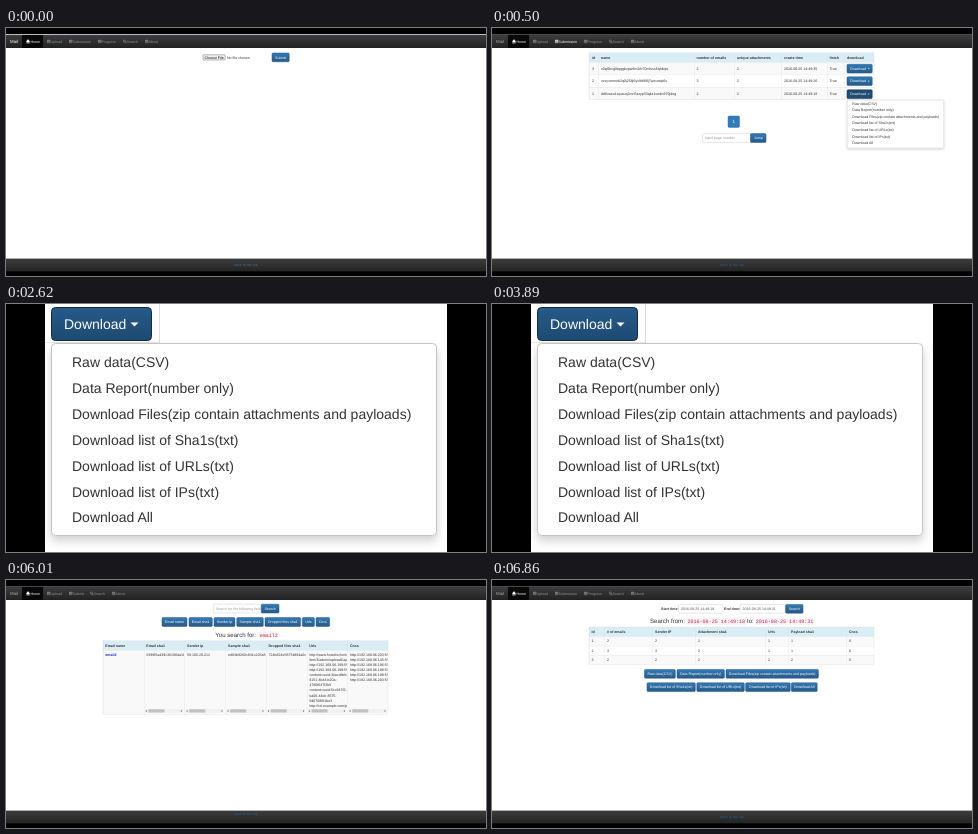
Write an HTML page that moves like this. It is 480 by 248 pixels and loops after 8 s.

```html
<!DOCTYPE html>
<html lang="en">
<head>
<meta charset="utf-8">
<title>Mail file reports</title>
<style>
html, body { margin: 0; width: 100%; height: 100%; overflow: hidden; background: #000; }
svg { display: block; width: 100vw; height: 100vh; }
text { font-family: "Liberation Sans", Arial, sans-serif; text-rendering: geometricPrecision; white-space: pre; }
.mono { font-family: "Liberation Mono", monospace; }
</style>
</head>
<body>
<svg id="stage" viewBox="0 0 480 248" xmlns="http://www.w3.org/2000/svg"></svg>
<script>
const SMALL = 3.58, LINE = '#ddd';

const rect = (x, y, w, h, fill, extra = '') =>
  `<rect x="${x}" y="${y}" width="${w}" height="${h}" fill="${fill}" ${extra}/>`;
const outline = (x, y, w, h, fill, stroke, r = 1) =>
  rect(x, y, w, h, fill, `stroke="${stroke}" stroke-width=".5" rx="${r}"`);
// y is the vertical middle of the text
const text = (x, y, s, { size = SMALL, fill = '#333', bold, mid, mono } = {}) =>
  `<text x="${x}" y="${y + size * 0.36}" font-size="${size}" fill="${fill}"` +
  `${bold ? ' font-weight="700"' : ''}${mid ? ' text-anchor="middle"' : ''}` +
  `${mono ? ' class="mono"' : ''}>${s}</text>`;
const caret = (x, y, s, fill) =>
  `<path d="M${x - s} ${y - s / 2}h${2 * s}l${-s} ${s}z" fill="${fill}"/>`;
const clip = (x, y, w, h, body) =>
  `<svg x="${x}" y="${y}" width="${w}" height="${h}" viewBox="${x} ${y} ${w} ${h}">${body}</svg>`;
const button = (x, y, w, s, h = 8.8) =>
  outline(x, y, w, h, 'url(#blue)', '#245580') +
  text(x + w / 2, y + h / 2, s, { fill: '#fff', mid: true });
const buttons = (y, list) => list.map(([x, end, s]) => button(x, y, end - x, s)).join('');
const field = (x, y, w, s, fill) =>
  outline(x, y, w, 8.8, '#fff', '#ccc') + clip(x, y, w - 0.5, 8.8, text(x + 2.4, y + 4.4, s, { fill }));
const code = (x, y, w, s) =>
  rect(x, y - 3.4, w, 6.8, '#f9f2f4', 'rx="1"') +
  text(x + w / 2, y, s, { size: 5.07, fill: '#c7254e', mid: true, mono: true });

const menu = ['Raw data(CSV)', 'Data Report(number only)',
  'Download Files(zip contain attachments and payloads)',
  ...['Sha1s', 'URLs', 'IPs'].map(s => `Download list of ${s}(txt)`), 'Download All'];

function icon(kind, x, fill) {
  const y = 13.4;
  if (kind === 'home')
    return `<path d="M${x} ${y}l2-2.2 2 2.2h-.6v2h-1v-1.4h-.8v1.4h-1v-2z" fill="${fill}"/>`;
  if (kind === 'search')
    return `<path d="M${x + 2} ${y + 0.4}l1.3 1.5" stroke="${fill}" stroke-width=".7"/>` +
      `<circle cx="${x + 1.4}" cy="${y - 0.3}" r="1.1" fill="none" stroke="${fill}" stroke-width=".6"/>`;
  return rect(x, y - 1.6, 3.3, 3.3, fill, 'opacity=".8"') +
    rect(x + 0.4, y - 0.5, 2.5, 0.4, '#333') + rect(x + 0.4, y + 0.6, 2.5, 0.4, '#333');
}

function page(body, { short, active, edge = '#4b484c', footY = 237, link = '#285f94', brand = '#aaa' } = {}) {
  const items = short
    ? [['Upload', 41], ['Submit', 63], ['Search', 84], ['About', 106]]
    : [['Upload', 41], ['Submission', 63], ['Progress', 92], ['Search', 117], ['About', 139]];
  const nav = items.map(([s, x]) => {
    const fill = s === active ? '#fff' : '#929292';
    return icon(s === 'Search' ? 'search' : 'box', x, fill) + text(x + 3.6, 13.4, s, { fill });
  }).join('');
  return rect(0, 6, 480, 225, '#fff') +
    rect(0, 6, 480, 14, 'url(#nav)') + rect(0, 6, 480, 1, edge) +
    text(4, 13.4, 'Mail', { size: 4.4, fill: brand }) +
    rect(16, 7, 21, 13, '#080808') + icon('home', 20, '#fff') +
    text(24.4, 13.4, 'Home', { fill: '#fff' }) + nav +
    rect(0, 230.6, 480, 12.8, 'url(#foot)') +
    text(240, footY, 'back to the top', { fill: link, mid: true }) + body;
}

// cols: [x, title]; rows: [top, height, cells]
function table(top, head, cols, rows) {
  const last = rows[rows.length - 1], bottom = last[0] + last[1];
  return rect(97, top, 285, head, '#d9edf7') +
    rows.map(([y, h, cells], i) =>
      rect(97, y, 285, h, i % 2 ? '#fff' : '#f9f9f9') + rect(97, y, 285, 0.35, LINE) +
      cells.map((s, c) => text(cols[c][0], y + h / 2, s)).join('')).join('') +
    cols.map(([x, s]) => rect(x - 2.3, top, 0.3, bottom - top, LINE) +
      text(x, top + head / 2, s, { bold: true })).join('') +
    `<rect x="97" y="${top}" width="285" height="${bottom - top}" fill="none" stroke="${LINE}" stroke-width=".35"/>`;
}

function upload() {
  return page(
    outline(197, 26.8, 22.2, 5.2, '#efefef', '#767676', 0.5) +
    text(208.1, 29.4, 'Choose File', { fill: '#000', mid: true }) +
    text(221, 29.4, 'No file chosen') + button(266, 25, 17.2, 'Submit'),
    { edge: '#c6b6c8', link: '#3974a9', brand: '#fff' });
}

function submissions() {
  const cols = [[100, 'id'], [109, 'name'], [204.5, 'number of emails'], [245, 'unique attachments'],
    [292, 'create time'], [337.5, 'finish'], [355, 'download']];
  const rows = [
    [34.4, 12.3, ['3', 'v0zj6bcg0tqqgbvpw6m2rlr70mlsss5qhkqts', '2', '2', '2016-08-25 14:49:35', 'True']],
    [46.7, 12.5, ['2', 'vzxyxmmnb2q0j258j6yx9d90fj7wzxwqk6s', '3', '2', '2016-08-25 14:49:26', 'True']],
    [59.2, 12.6, ['1', 'dd6vaeu1iqoauq2mn5zzyp33qkz1vwkn979j4eg', '2', '2', '2016-08-25 14:49:18', 'True']]];
  const loads = [36.3, 48.8, 61.8].map((y, i) =>
    outline(355, y, 25.2, 8.8, i === 2 ? '#204d74' : 'url(#blue)', i === 2 ? '#122b40' : '#245580') +
    text(358.2, y + 4.4, 'Download', { fill: '#fff' }) + caret(376.6, y + 4.5, 1, '#fff')).join('');
  return page(
    table(24.8, 9.6, cols, rows) + loads +
    outline(236, 88, 11.5, 11.4, '#337ab7', '#337ab7', 1.2) +
    text(241.8, 93.7, '1', { size: 4.6, fill: '#fff', mid: true }) +
    field(210.5, 105.6, 48, 'Input page number', '#999') + button(258.5, 105.6, 15.5, 'Jump') +
    `<g filter="url(#soft)">${outline(355.2, 72, 96.6, 48, '#fff', '#ccc')}</g>` +
    menu.map((s, i) => text(360.3, 75.6 + i * 6.53, s)).join(''),
    { active: 'Submission' });
}

function closeUp() {
  return rect(39, 0, 402, 248, '#fff') + rect(39, 38, 114, 1, '#e8e8e8') + rect(153, 0, 1, 39, '#ddd') +
    `<g filter="url(#deep)"><rect x="45.5" y="39.5" width="385" height="192" rx="4" fill="#fff" stroke="#c4c4c4"/></g>` +
    '<rect x="45.5" y="3.5" width="100" height="33" rx="4" fill="url(#dark)" stroke="#122b40"/>' +
    text(58, 20, 'Download', { size: 14, fill: '#fff' }) + caret(128.5, 20.5, 4, '#fff') +
    menu.map((s, i) => text(66, 58 + i * 25.9, s, { size: 14 })).join('');
}

function searchField() {
  const cols = [[99.3, 'Email name'], [140.3, 'Email sha1'], [181, 'Sender ip'], [222, 'Sample sha1'],
    [262.5, 'Dropped files sha1'], [303.3, 'Urls'], [344, 'Cncs']];
  const urls = ['http://www.hostelschein-k', 'fbm/3/admin/uploadCap7', 'http://192.168.06.199:55',
    'http://192.168.06.198:55', 'content=uuid:34acd9eb-', '8151-4b44-b20a-', '4780f647f2b5', 'content=uuid:5cc947f2-',
    'ba06-44dc-8575-', '0d67086f1be3', 'http://crl.example.com/p'];
  const cncs = [203, 145, 196, 198, 198, 203].map(n => `http://192.168.06.${n}:55`);
  const cells = [[], ['0399f5ad39c36190da1b7'], ['59.160.20.212'], ['ed83b9260c841c226a8c1'],
    ['724b824e58754894a0c35'], urls, cncs];
  const bar = x => rect(x, 128.7, 38.5, 4.4, '#f1f1f1') +
    rect(x + 4, 129.3, 16, 3.2, '#c1c1c1') +
    `<path d="M${x + 2.2} 129.9v2l-1.2-1zM${x + 36.4} 129.9v2l1.2-1z" fill="#555"/>`;
  const body = cells.map((lines, c) => clip(cols[c][0], 70, 37.6, 58,
    lines.map((s, i) => text(cols[c][0], 74.3 + i * 5.12, s)).join('')) +
    (c ? bar(cols[c][0] - 1.8) : '')).join('');
  return page(
    field(207.3, 24.2, 48, 'Search for the following field', '#999') + button(255.3, 24.2, 17.7, 'Search') +
    buttons(37.6, [[156, 181, 'Email name'], [183, 206.3, 'Email sha1'], [208, 229, 'Sender ip'],
      [230.8, 257.3, 'Sample sha1'], [259, 294.6, 'Dropped files sha1'], [296.3, 308.4, 'Urls'], [310, 323.6, 'Cncs']]) +
    text(209.3, 54.5, 'You search for:', { size: 6.1 }) + code(252.5, 54.7, 20.5, 'email2') +
    table(60.7, 9.5, cols, [[70.2, 64, []]]) +
    text(99.3, 74.3, 'email2', { fill: '#1717d8', bold: true }) + body,
    { short: true, footY: 233.5 });
}

function searchTime() {
  const from = '2016-08-25 14:49:18', to = '2016-08-25 14:49:31';
  const cols = [[99.5, 'Id'], [115, '# of emails'], [163, 'Sender IP'], [206, 'Attachment sha1'],
    [276, 'Urls'], [299, 'Payload sha1'], [357, 'Cncs']];
  const rows = [
    [56.5, 9.4, ['1', '2', '2', '2', '1', '1', '0']],
    [65.9, 9.3, ['2', '3', '3', '2', '1', '1', '0']],
    [75.2, 9.3, ['3', '2', '2', '2', '2', '2', '0']]];
  return page(
    text(169, 28.8, 'Start time:', { bold: true }) + field(186.6, 24.4, 44.4, from, '#555') +
    text(232, 28.8, 'End time:', { bold: true }) + field(248.2, 24.4, 44.8, to, '#555') +
    button(293.6, 24.4, 17.4, 'Search') +
    text(158, 41.2, 'Search from:', { size: 6.1 }) + code(194.5, 41.6, 59.5, from) +
    text(255, 41.2, 'to:', { size: 6.1 }) + code(262.8, 41.6, 59.5, to) +
    table(47, 9.5, cols, rows) +
    buttons(89.4, [[152.5, 183.3, menu[0]], [185, 232.4, menu[1]], [234, 326.4, menu[2]]]) +
    buttons(102.8, [[155, 203.3, menu[3]], [204.8, 252.3, menu[4]], [253.6, 298.2, menu[5]], [299.3, 325.2, menu[6]]]),
    {});
}

const gradient = (id, top, bottom) =>
  `<linearGradient id="${id}" x2="0" y2="1"><stop stop-color="${top}"/><stop offset="1" stop-color="${bottom}"/></linearGradient>`;
const shadow = (id, dy, blur) =>
  `<filter id="${id}"><feDropShadow dx="0" dy="${dy}" stdDeviation="${blur}" flood-opacity=".18"/></filter>`;

const scenes = [[0, upload], [500, submissions], [2620, closeUp], [4740, searchField], [6860, searchTime]];
const stage = document.getElementById('stage');
stage.innerHTML = '<defs>' + gradient('nav', '#3f3d40', '#222') + gradient('foot', '#3c3c3c', '#242424') +
  gradient('blue', '#337ab7', '#265a88') + gradient('dark', '#265a88', '#1d4a72') +
  shadow('soft', 1.2, 1.2) + shadow('deep', 5, 5) + '</defs>' +
  rect(0, 0, 480, 248, '#000') + scenes.map(([, draw]) => `<g class="scene">${draw()}</g>`).join('');
const groups = stage.querySelectorAll('.scene');

function show(ms) {
  const t = ms % 8000;
  const now = scenes.filter(([start]) => start <= t).length - 1;
  groups.forEach((g, i) => g.setAttribute('display', i === now ? 'inline' : 'none'));
}
function tick() {
  show(performance.now());
  requestAnimationFrame(tick);
}
tick();
</script>
</body>
</html>
```
